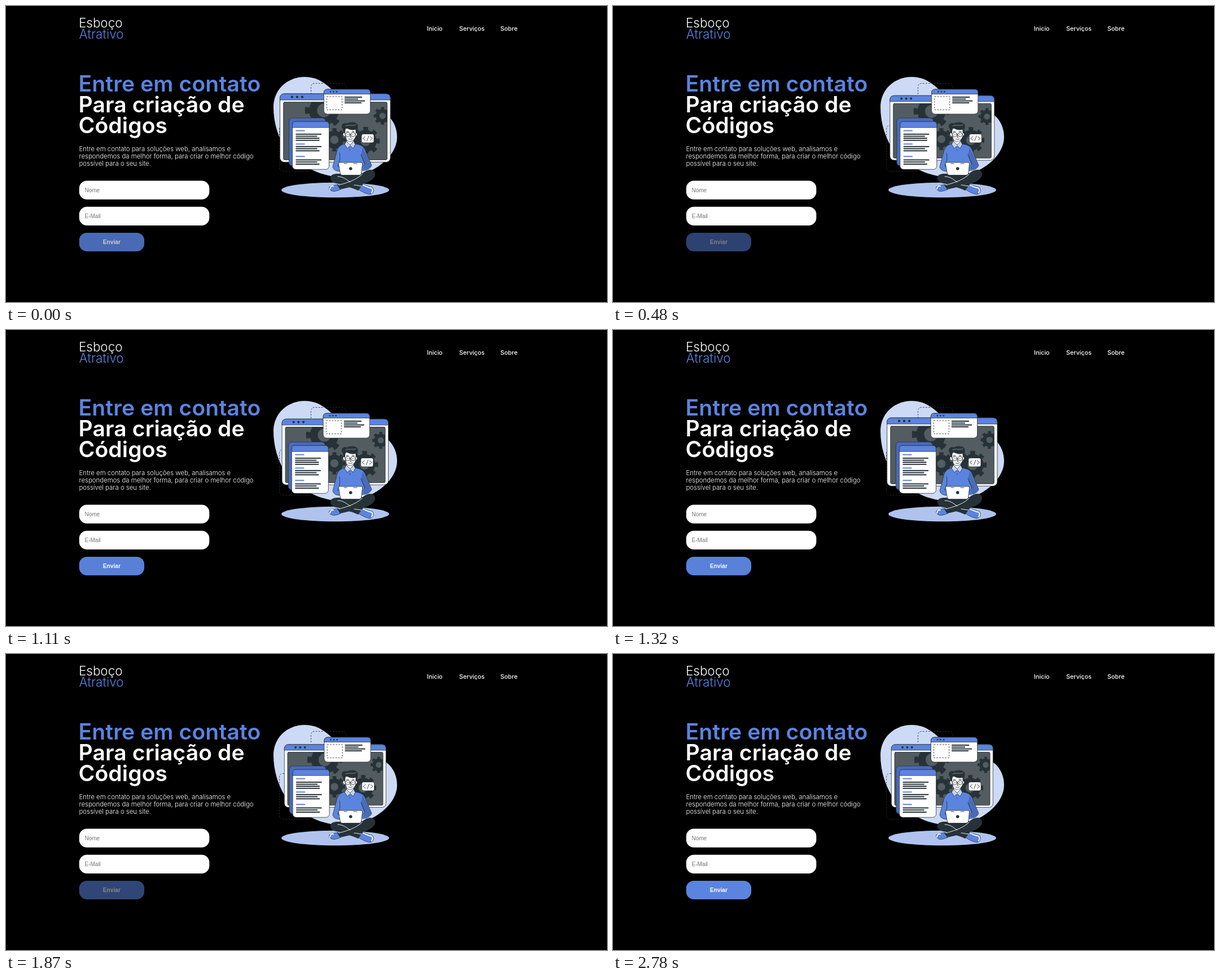
These frames come from a looping animation (1065 px wide and 526 px high, 2.85 s). An HTML page:

```html
<!DOCTYPE html>
<html lang="pt">
<head>
<meta charset="utf-8">
<title>Contato</title>
<style>
  html, body { margin: 0; width: 100%; height: 100%; overflow: hidden; background: #000; }
  svg { display: block; width: 1065px; height: 526px; font-family: Inter, "Open Sans", sans-serif; }
  .blue { fill: #5b84df; }
  .dark { fill: #263238; }
  .white { fill: #fff; }
  .line { stroke: #263238; stroke-width: .8; stroke-linejoin: round; }
  .pen { fill: none; stroke: #263238; stroke-width: .9; stroke-linecap: round; }
  .sole { fill: none; stroke: #fff; stroke-width: 2; stroke-linecap: round; }
  .dash { fill: none; stroke: #263238; stroke-width: .8; stroke-dasharray: 3 2; }
  .logo { font-size: 22.4px; font-weight: 300; }
  .nav { font-size: 10.8px; font-weight: 500; }
  .title { font-size: 39px; font-weight: 600; letter-spacing: .15px; }
  .lead { font-size: 11.4px; font-weight: 300; }
  .field { font: 10px Arial, "Liberation Sans", sans-serif; fill: #757575; }
  .send { font: bold 10.2px Arial, "Liberation Sans", sans-serif; }
</style>
</head>
<body>
<svg viewBox="0 0 1065 526">
  <g class="white">
    <g class="logo"><text x="129" y="38">Esboço</text><text x="129.500" y="58" class="blue">Atrativo</text></g>
    <g class="nav"><text x="746" y="44">Inicio</text><text x="803" y="44">Serviços</text><text x="876" y="44">Sobre</text></g>
    <g class="title">
      <text x="128.500" y="152" class="blue">Entre em contato</text>
      <text x="128.500" y="189">Para criação de</text>
      <text x="128.500" y="226">Códigos</text>
    </g>
    <g class="lead">
      <text x="129.500" y="257.700">Entre em contato para soluções web, analisamos e</text>
      <text x="129.500" y="270.900">respondemos da melhor forma, para criar o melhor código</text>
      <text x="129.500" y="284.100">possível para o seu site.</text>
    </g>
    <rect x="129.700" y="310.600" width="230.600" height="33.200" rx="13.500"/>
    <rect x="129.700" y="356.700" width="230.600" height="33.200" rx="13.500"/>
    <text class="field" x="139.500" y="330.700">Nome</text>
    <text class="field" x="139.500" y="376.700">E-Mail</text>
    <g id="button">
      <rect class="blue" x="129.700" y="402.900" width="115.300" height="33.100" rx="13.500"/>
      <text class="send" x="187.300" y="423" text-anchor="middle">Enviar</text>
    </g>
  </g>

  <path fill="#cddaf5" d="M474 180C474 147 500 126 529 126C560 126 572 146 590 158C620 178 657 180 677 195C688 205 693 219 693 233C693 270 645 304 600 304C555 304 530 285 508 269C486 248 474 212 474 180Z"/>
  <path class="dash" d="M540.500 157V144Q540.500 137.500 547 137.500H596Q602 137.500 602 144V150M508 212.500H491Q484.500 212.500 484.500 219V287Q484.500 293.500 491 293.500H540"/>
  <ellipse cx="583.500" cy="327" rx="95.500" ry="13.300" fill="#afc3ee"/>

  <g id="monitor">
    <rect class="white line" x="493.300" y="160.800" width="180" height="111.700" rx="7"/>
    <path class="blue line" d="M493.300 171V168Q493.300 160.800 501 160.800H666Q673.300 160.800 673.300 168V171Z"/>
    <g class="dark"><circle cx="513" cy="166" r="2"/><circle cx="521.300" cy="166" r="2"/><circle cx="529.600" cy="166" r="2"/></g>
    <clipPath id="screen"><rect x="499" y="174.500" width="169" height="94.300" rx="2"/></clipPath>
    <g clip-path="url(#screen)"><rect x="499" y="174" width="169" height="96" fill="#535c61"/><g id="gears"></g></g>
    <rect class="pen" x="499" y="174.500" width="169" height="94.300" rx="2"/>
  </g>

  <g id="windows">
    <rect class="line" fill="#4a6bb7" x="501.500" y="199" width="65" height="85" rx="6"/>
    <rect class="white line" x="507.500" y="205.300" width="65" height="85" rx="6"/>
    <path class="blue line" d="M507.500 216V211Q507.500 205.300 513.500 205.300H566.500Q572.500 205.300 572.500 211V216Z"/>
    <rect class="white line" x="563.300" y="148" width="82.300" height="44" rx="6"/>
    <path class="blue line" d="M563.300 156.500V154Q563.300 148 569 148H640Q645.600 148 645.600 154V156.500Z"/>
    <g class="dark"><circle cx="575" cy="152.300" r="1.400"/><circle cx="580.500" cy="152.300" r="1.400"/><circle cx="586" cy="152.300" r="1.400"/></g>
    <rect class="dash" x="568.500" y="161" width="27" height="23.500"/>
    <g id="rows"></g>
  </g>

  <g id="man">
    <path class="blue line" d="M573 325C571 318 580 320 588 317L593 326C585 329 578 332 573 325Z"/>
    <path class="sole" d="M574 325Q575 319 580 320"/>
    <path class="blue line" d="M628 317C636 316 640 321 649 322C653 327 651 334 645 334.500C637 334 630 329 624 326Z"/>
    <path class="sole" d="M633 318.500C639 320 641 323 648 323.500Q651 328 648 332"/>
    <path class="dark" d="M577 310C586 317 610 321 624 328L632 317L606 303Z"/>
    <path class="dark" d="M575 307C573 297 588 297 598 299L632 297C640 290 651 288 654 297C656 309 638 316 618 320L592 326L587 318L602 315C586 317 577 315 575 307Z"/>
    <path class="pen" style="stroke:#fff" d="M590 318C610 313 623 307 631 299M588 303C598 303 604 309 610 313M617 318L630 320"/>
    <path class="blue line" d="M601 245C590 247 587 253 585 263L579 286C581 293 589 295 596 293L626 292C636 293 645 291 648 283L638 260C635 250 631 247 618 245Z"/>
    <path fill="#4a6bb7" d="M632 251C637 262 644 274 647 283C645 290 638 291 632 290L636 283L629 266Z"/>
    <path class="pen" d="M591 261C593 270 591 277 588 284L594 289M629 264L636 281L631 287"/>
    <path class="white line" d="M604 235V246L609 251L616 245V235Z"/>
    <path class="line" fill="#c5d4f3" d="M603 240L600 246L605 253L610 248L615 253L619 246L616 240L610 247Z"/>
    <circle class="dark" cx="609.500" cy="256" r=".8"/>
    <path class="white line" d="M600 219Q610 213 620 219V231C618 237 614 241 609 241C604 240 601 235 600 229Z"/>
    <path class="dark" d="M597 219C592 212 597 206 604 208.500C611 205 622 206 623.500 212C624.500 216 622 220 621 227L619.500 219.500C613 222 606 219 603 216.500C601 219 601 224 601 229L604 237L599 230Z"/>
    <path class="white line" d="M600 226C596 223 596 232 601 232M620 226C623 224 623 231 620 231"/>
    <path class="pen" style="stroke:#b8c1c8;stroke-width:.6" d="M602 213C607 210 614 214 620 211"/>
    <g class="pen"><circle cx="605.500" cy="228.500" r="3.800"/><circle cx="615" cy="228.500" r="3.800"/><path d="M609 228H611.500M603 223.500L607 223M613 223L617 223.500M610.500 230L610 233.500H612M607 236.500Q610 238.500 614 236"/></g>
    <g class="dark"><circle cx="606" cy="228.500" r=".8"/><circle cx="614.500" cy="228.500" r=".8"/></g>
    <path class="white line" d="M591 278H629Q632 278 631.500 281L629.500 298Q629 300.500 626 300.500H596Q593 300.500 592.500 298L589.500 281Q589 278 591 278Z"/>
    <circle class="dark" cx="610.700" cy="289" r="2.800"/>
    <path class="pen" d="M599 280H604M616 280H622"/>
  </g>

  <g id="bubble">
    <rect class="white line" x="630" y="227.500" width="22" height="15.500" rx="3"/>
    <path class="pen" d="M636.500 232L632.500 235.300L636.500 238.500M639.500 239.500L643 231M645.500 232L649.500 235.300L645.500 238.500"/>
  </g>
</svg>
<script>
const $ = id => document.getElementById(id);
const LOOP = 2850, STEP = 69.5;

// Each gear: a thick ring and a dashed ring for the teeth.
const gear = (x, y, r) => `<g fill="none" stroke="#263238" transform="translate(${x} ${y})">
  <circle r="${r * .57}" stroke-width="${r * .42}"/>
  <circle r="${r * .87}" stroke-width="${r * .26}" pathLength="16" stroke-dasharray="1" transform="rotate(-11)"/></g>`;
$('gears').innerHTML = gear(565, 188, 31) + gear(660.5, 197, 14.5) + gear(582, 236, 19) + gear(633, 238, 23);

const row = (x, y, w, color = 'dark') =>
  `<rect class="${color}" x="${x}" y="${y - 1}" width="${w}" height="2"/>`;
const block = (blueY, ys) => row(513.5, blueY, 16, 'blue') +
  ys.map((y, i) => row(513.5, y, [45.5, 38, 42, 42][i])).join('');
$('rows').innerHTML = [31, 24, 36, 30].map((w, i) => row(600, 162 + i * 3.35, w)).join('') +
  block(221.5, [227.8, 231.5, 235, 238.7]) +
  block(245.3, [249.8, 253.5, 257.3]) +
  block(267.3, [273.5, 277.2, 281]);

// Linear interpolation through [time, value] pairs.
function along(keys, t) {
  const i = keys.findIndex(k => k[0] > t);
  if (i < 0) return keys[keys.length - 1][1];
  const [t0, a] = keys[i - 1], [t1, b] = keys[i];
  return a + (b - a) * (t - t0) / (t1 - t0);
}
const beat = [[-269, 1], [40, 1.1], [658, 1], [967, 1], [1276, 1.1], [1585, 1]];
const sway = [[0, 0], [480, 1.3], [1110, -1.2], [1530, 1], [1870, .6], [2290, -.3], [2780, .1]];

function draw(now) {
  const t = Math.floor((now % LOOP + 8) / STEP) * STEP;
  const shift = `translate(${along(sway, t)} 0)`;
  $('monitor').setAttribute('transform',
    `translate(583.3 216.5) scale(${along(beat, t)}) translate(-583.3 -216.5)`);
  $('windows').setAttribute('transform', shift);
  $('bubble').setAttribute('transform', shift);
  $('button').setAttribute('opacity', .75 + .25 * Math.cos(2 * Math.PI * (t - 1220) / 1550));
}
function tick() {
  draw(performance.now());
  requestAnimationFrame(tick);
}
tick();
</script>
</body>
</html>
```
